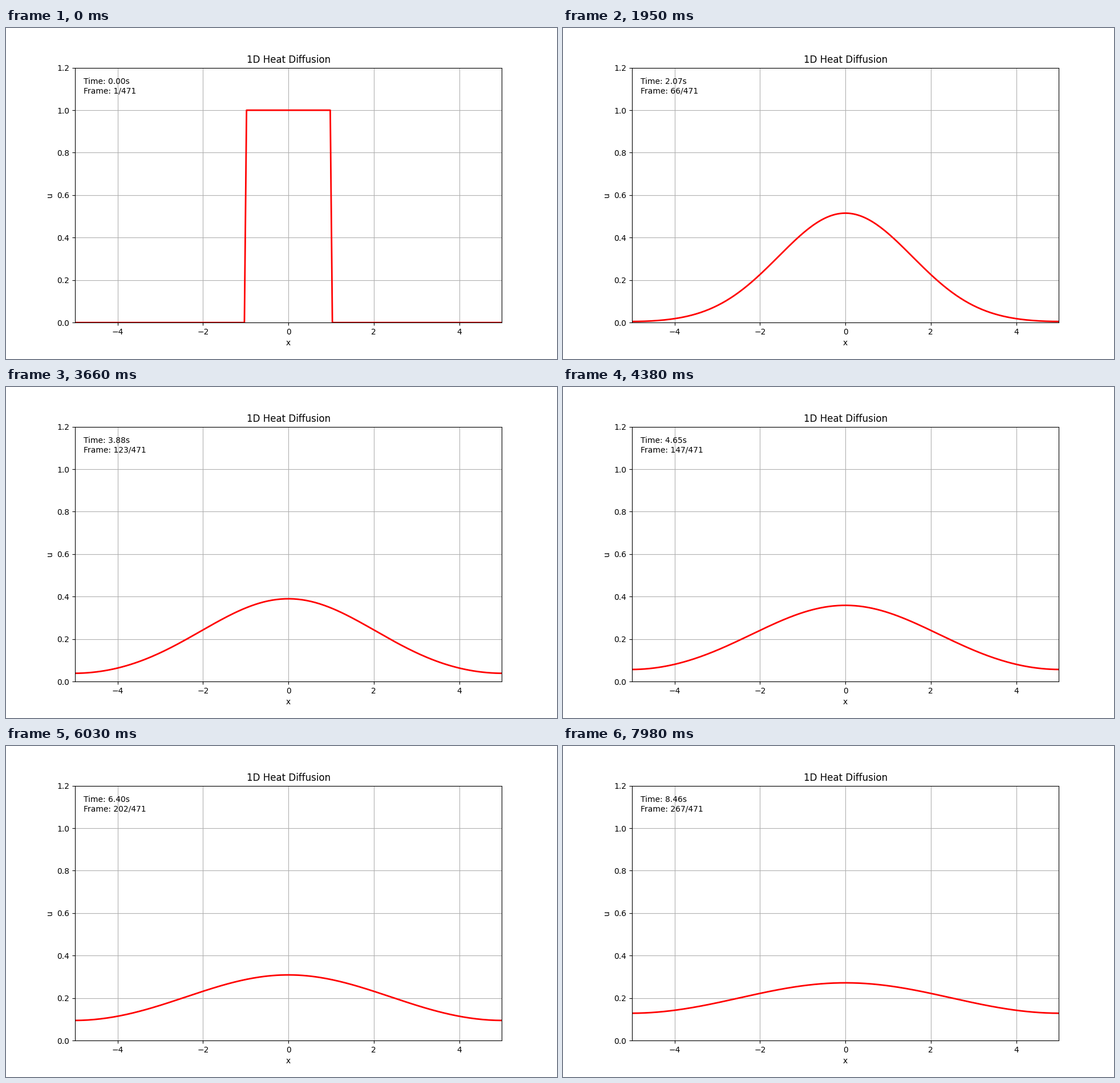
Animation, 966 px wide and 580 px high, one loop 8 s. Source, as a matplotlib script:

```python
import numpy as np
import matplotlib.pyplot as plt
from matplotlib.animation import FuncAnimation

ALPHA = 0.5            # diffusivity
RATIO = 0.45           # alpha * dt / dx^2
STEPS_PER_STATE = 14
TOTAL_STATES = 471     # length of the full simulation, shown in the counter
STATE_MS = 30
TICK_MS = 20
LOOP_MS = 8000

x = np.linspace(-5, 5, 200)
dx = x[1] - x[0]
dt = RATIO * dx**2 / ALPHA


def step(u):
    """One explicit step of the heat equation, periodic in x."""
    return u + RATIO * (np.roll(u, 1) - 2 * u + np.roll(u, -1))


def simulate(count):
    u = np.where(np.abs(x) < 1, 1.0, 0.0)
    states = [u]
    for _ in range(count - 1):
        for _ in range(STEPS_PER_STATE):
            u = step(u)
        states.append(u)
    return states


states = simulate(LOOP_MS // STATE_MS + 1)

fig, ax = plt.subplots(figsize=(9.66, 5.8), dpi=100)
ax.set_xlim(-5, 5)
ax.set_ylim(0, 1.2)
ax.set_xlabel("x")
ax.set_ylabel("u")
ax.set_title("1D Heat Diffusion")
ax.grid(True)
line, = ax.plot(x, states[0], "r-", lw=2)
label = ax.text(0.02, 0.9, "", transform=ax.transAxes)


def update(tick):
    # the middle of the tick decides which state is on show
    k = (tick * TICK_MS + TICK_MS // 2) // STATE_MS
    line.set_ydata(states[k])
    time = k * STEPS_PER_STATE * dt
    label.set_text(f"Time: {time:.2f}s\nFrame: {k + 1}/{TOTAL_STATES}")
    return line, label


def init():
    return update(0)


anim = FuncAnimation(fig, update, frames=LOOP_MS // TICK_MS, init_func=init,
                     interval=TICK_MS, repeat=True, repeat_delay=0)
plt.show()
```
